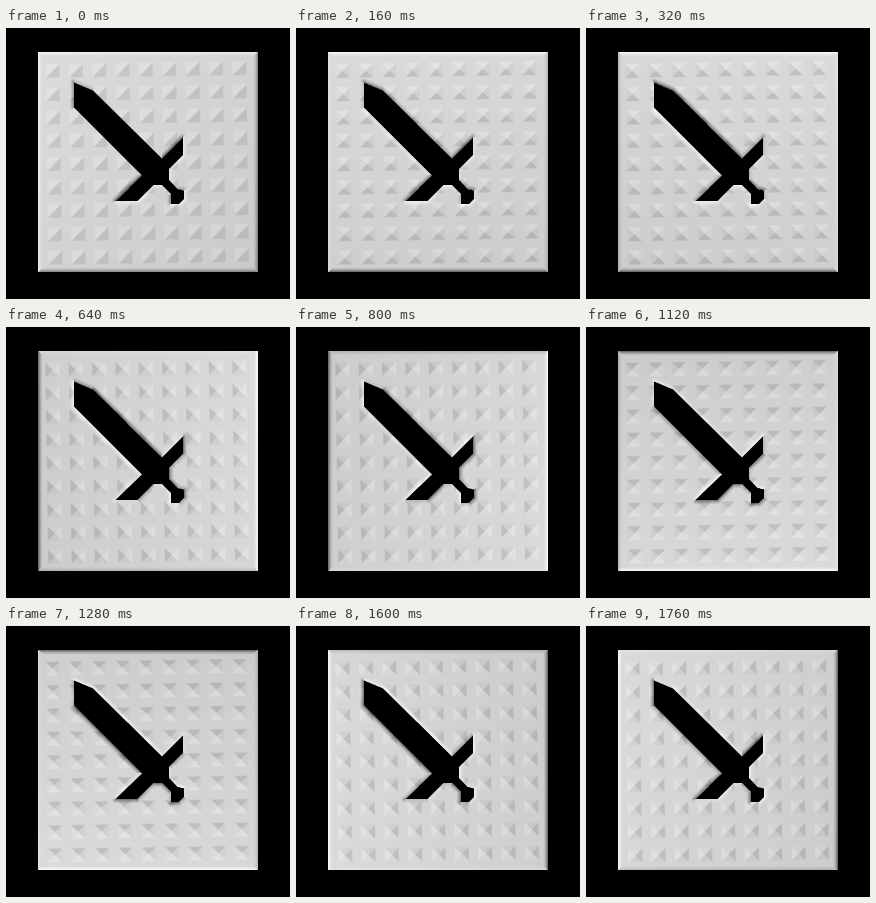
An HTML page with a canvas for the animation above (1920 ms loop, 284 by 271 pixels).

```html
<!DOCTYPE html>
<html>
<head>
<meta charset="utf-8">
<style>
html, body { margin: 0; height: 100%; overflow: hidden; background: #000; }
canvas { display: block; }
</style>
</head>
<body>
<canvas id="stage" width="284" height="271"></canvas>
<script>
const W = 284, H = 271, STEP = 160, STEPS = 12;
const LEFT = 32, TOP = 24, SIZE = 220, RIM = 5;
const GRID = { x: 141.2, y: 134.8, pitch: 23.35, half: 7.2, tilt: -0.0145 };
const sword = [
  [68, 54.5], [87, 62.5], [156, 130.5], [177, 109.5], [177, 127], [163, 141],
  [163, 152], [171.5, 161], [178, 162.5], [178, 171], [173, 176], [165, 176],
  [165, 166], [156, 157], [147.5, 157], [131.5, 173], [109.5, 173], [136, 147.5], [68, 79.5]
];
const ctx = document.getElementById('stage').getContext('2d');
const image = ctx.createImageData(W, H);
const clamp = (v, lo = 0, hi = 1) => Math.max(lo, Math.min(hi, v));

// Signed distance to the sword (negative inside) and direction towards it.
function swordField(x, y) {
  let best = 1e9, dx = 0, dy = 0, inside = false;
  sword.forEach(([ax, ay], i) => {
    const [bx, by] = sword[(i + 1) % sword.length];
    const ex = bx - ax, ey = by - ay;
    const t = clamp(((x - ax) * ex + (y - ay) * ey) / (ex * ex + ey * ey));
    const px = ax + ex * t - x, py = ay + ey * t - y, d = Math.hypot(px, py);
    if (d < best) [best, dx, dy] = [d, px / (d || 1), py / (d || 1)];
    if ((ay > y) !== (by > y) && x < ax + ex * (y - ay) / ey) inside = !inside;
  });
  return { d: inside ? -best : best, dx, dy };
}

function studSlope(x, y) {
  const c = Math.cos(GRID.tilt), s = Math.sin(GRID.tilt);
  const gx = ((x - GRID.x) * c + (y - GRID.y) * s) / GRID.pitch;
  const gy = ((y - GRID.y) * c - (x - GRID.x) * s) / GRID.pitch;
  const col = Math.round(gx), row = Math.round(gy);
  if (Math.abs(col) > 4 || Math.abs(row) > 4) return [0, 0];
  const u = (gx - col) * GRID.pitch, v = (gy - row) * GRID.pitch;
  const au = Math.abs(u), av = Math.abs(v);
  const mask = clamp((GRID.half + 0.5 - Math.max(au, av)) / 1.5);
  const side = clamp(0.5 + (au - av) / 2);
  return [clamp(u, -1, 1) * side * mask, clamp(v, -1, 1) * (1 - side) * mask];
}

const falloff = d => clamp(1 - d / RIM) ** 1.6;

const pixels = [];
for (let py = TOP; py < TOP + SIZE; py++) {
  for (let px = LEFT; px < LEFT + SIZE; px++) {
    const x = px + 0.5, y = py + 0.5;
    const hole = swordField(x, y);
    const sides = [[x - LEFT, -1, 0], [LEFT + SIZE - x, 1, 0], [y - TOP, 0, -1], [TOP + SIZE - y, 0, 1]];
    const [d, nx, ny] = sides.reduce((a, b) => b[0] < a[0] ? b : a);
    const outer = falloff(d), inner = falloff(Math.max(0, hole.d));
    const [sx, sy] = studSlope(x, y);
    pixels.push({
      at: (py * W + px) * 4,
      cover: clamp(0.5 + hole.d),
      ex: nx * outer + hole.dx * inner, ey: ny * outer + hole.dy * inner,
      sx, sy,
      cx: (x - LEFT) / SIZE * 2 - 1, cy: (y - TOP) / SIZE * 2 - 1
    });
  }
}
for (let i = 3; i < image.data.length; i += 4) image.data[i] = 255;

const lit = (v, bright, dark) => v * (v > 0 ? bright : dark);

function draw(step) {
  const angle = (135 - step * 360 / STEPS) * Math.PI / 180;
  const lx = Math.cos(angle), ly = -Math.sin(angle);
  for (const p of pixels) {
    const tone = 211 + 6 * (p.cx * lx + p.cy * ly)
      + lit(p.sx * lx + p.sy * ly, 11, 25)
      + lit(p.ex * lx + p.ey * ly, 36, 115);
    const value = tone * p.cover;
    image.data[p.at] = image.data[p.at + 1] = image.data[p.at + 2] = value;
  }
  ctx.putImageData(image, 0, 0);
}

let shown = -1;
function tick() {
  const step = Math.floor(performance.now() / STEP) % STEPS;
  if (step !== shown) draw(shown = step);
  requestAnimationFrame(tick);
}
tick();
</script>
</body>
</html>
```
